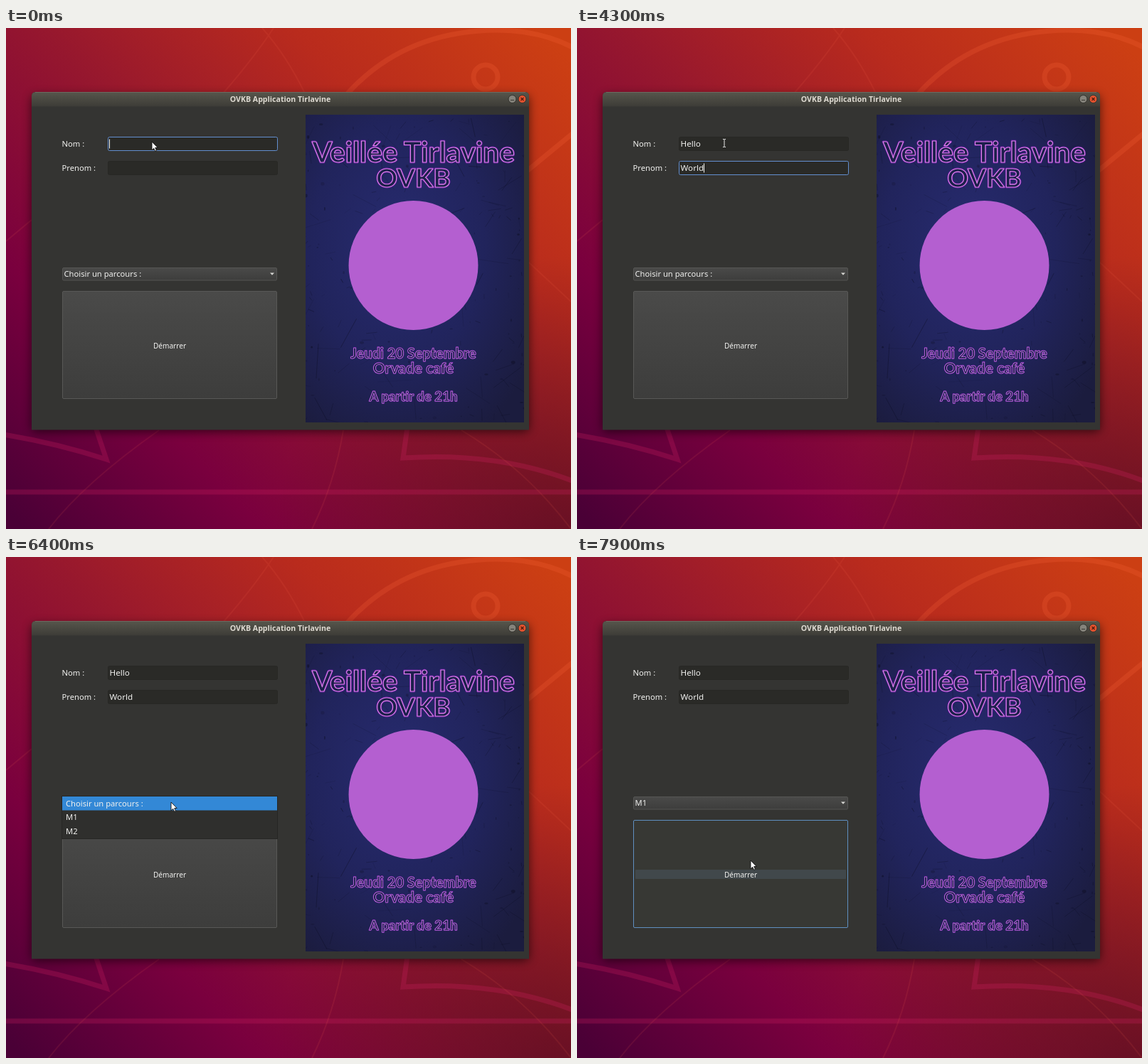
Animation, 794 px wide and 705 px high, one loop 8000 ms. Source, as an HTML page:

```html
<!DOCTYPE html>
<html lang="fr">
<head>
<meta charset="utf-8">
<title>Application</title>
<style>
  html, body { margin: 0; width: 100%; height: 100%; overflow: hidden; background: #7a0a3a; }
  svg { display: block; width: 100vw; height: 100vh; }
  text { font-family: "Noto Sans", "Open Sans", sans-serif; font-size: 11.2px; fill: #f0f0ee; white-space: pre; }
  .field { font-size: 11.65px; }
  .neon text { font-family: Lato, sans-serif; text-anchor: middle; fill: #1d1f4c; stroke-linejoin: round; }
  .neon .halo { stroke: #63209a; stroke-width: 2.8; }
  .neon .line { stroke: #e286ee; stroke-width: 1.15; }
  .neon .fine.halo { stroke-width: 1.8; }
  .neon .fine.line { stroke: #c97be2; stroke-width: .75; }
</style>
</head>
<body>
<svg viewBox="0 0 794 705" preserveAspectRatio="none">
  <defs>
    <linearGradient id="wall" gradientUnits="userSpaceOnUse" x1="770" y1="20" x2="40" y2="720">
      <stop offset="0" stop-color="#cc3f13"/>
      <stop offset=".25" stop-color="#b92b1d"/>
      <stop offset=".5" stop-color="#96172e"/>
      <stop offset=".76" stop-color="#7a003e"/>
      <stop offset="1" stop-color="#4a0036"/>
    </linearGradient>
    <radialGradient id="corner" gradientUnits="userSpaceOnUse" cx="794" cy="740" r="420">
      <stop offset="0" stop-color="#4d0a20" stop-opacity=".7"/>
      <stop offset="1" stop-color="#4d0a20" stop-opacity="0"/>
    </radialGradient>
    <linearGradient id="bar" x2="0" y2="1">
      <stop offset="0" stop-color="#57564c"/>
      <stop offset="1" stop-color="#3d3c37"/>
    </linearGradient>
    <linearGradient id="raised" x2="0" y2="1">
      <stop offset="0" stop-color="#4a4a49"/>
      <stop offset="1" stop-color="#3d3d3c"/>
    </linearGradient>
    <linearGradient id="hover" x2="0" y2="1">
      <stop offset="0" stop-color="#515150"/>
      <stop offset="1" stop-color="#434342"/>
    </linearGradient>
    <radialGradient id="night" cx=".42" cy=".42" r=".72">
      <stop offset="0" stop-color="#272b70"/>
      <stop offset=".55" stop-color="#21245c"/>
      <stop offset="1" stop-color="#1b1c3e"/>
    </radialGradient>
    <filter id="shadow" x="-10%" y="-10%" width="120%" height="125%">
      <feGaussianBlur stdDeviation="7"/>
    </filter>
    <clipPath id="sheet"><rect x="421" y="122" width="307" height="433"/></clipPath>
  </defs>

  <rect width="794" height="705" fill="url(#wall)"/>
  <rect width="794" height="705" fill="url(#corner)"/>
  <g fill="none" stroke="#ff6a3c" stroke-opacity=".2" stroke-width="7">
    <path d="M480 92Q560 4 690 3Q750 3 798 28"/>
    <circle cx="674" cy="69" r="17"/>
    <path d="M730 203L798 147"/>
  </g>
  <g fill="none" stroke="#d02060" stroke-opacity=".26" stroke-width="7">
    <path d="M0 653H794"/>
    <path d="M-4 572Q70 584 141 607L126 562"/>
    <path d="M564 562L558 605Q690 596 798 638"/>
  </g>
  <g fill="none" stroke="#ff6a50" stroke-opacity=".1" stroke-width="2">
    <path d="M305 92Q350 40 376 0M360 0Q395 40 420 92M0 300L36 270M735 330L794 385"/>
    <path d="M430 705Q462 640 474 566M60 705Q110 640 215 566M640 566Q730 620 794 705"/>
  </g>

  <rect x="36" y="95" width="699" height="473" rx="6" fill="#000" opacity=".6" filter="url(#shadow)"/>
  <path d="M36 565.5V96Q36 90 42 90H729Q735 90 735 96V565.5Z" fill="#343432"/>
  <path d="M36 110.500V96Q36 90 42 90H729Q735 90 735 96V110.500Z" fill="url(#bar)"/>
  <path d="M41 90.500H730" stroke="#6b6a60"/>
  <text x="385.500" y="104" text-anchor="middle" style="font-size:10.600px;font-weight:700;fill:#dfdbd2">OVKB Application Tirlavine</text>
  <circle cx="711.500" cy="100" r="5.500" fill="#85837b" stroke="#33322d"/>
  <path d="M709 101.500H714" stroke="#3a3934"/>
  <circle cx="725.500" cy="100" r="5.500" fill="#e5532f" stroke="#33322d"/>
  <path d="M723.500 98L727.500 102M727.500 98L723.500 102" stroke="#4a1a0c" stroke-width="1.200"/>

  <g clip-path="url(#sheet)">
    <rect x="421" y="122" width="307" height="433" fill="url(#night)"/>
    <g id="grunge" stroke="#0c0d20" fill="#0e0f24"></g>
  </g>
  <circle cx="572.500" cy="334" r="91" fill="#b45fd0"/>
  <g id="poster" class="neon"></g>

  <text x="78.500" y="167">Nom :</text>
  <text x="78.500" y="201">Prenom :</text>
  <g id="inputs"></g>

  <rect id="combo" x="79.500" y="337.500" width="301" height="17.500" rx="1.500"/>
  <text id="choice" x="81.500" y="350"></text>
  <path d="M371 344.500H377L374 347.800Z" fill="#d8d8d4"/>

  <rect id="button" x="79.500" y="370.500" width="301" height="151" rx="1.500"/>
  <rect id="band" x="82" y="440" width="296" height="13" rx="1" fill="#41484b"/>
  <text x="230" y="450.500" text-anchor="middle" style="font-size:10.100px">Démarrer</text>

  <g id="popup">
    <rect x="78.500" y="336.500" width="303" height="60" fill="#2f2f2d" stroke="#262624"/>
    <rect id="mark" x="79" width="302" height="19.500" fill="#3388d6"/>
    <text x="84" y="350.500">Choisir un parcours :</text>
    <text x="84" y="370">M1</text>
    <text x="84" y="389.500">M2</text>
  </g>

  <path id="arrow" d="M0 0V11.800L2.700 9.300L4.600 13.300L6.500 12.400L4.700 8.500H8.200Z" fill="#fff" stroke="#111" stroke-width=".9"/>
  <path id="beam" d="M-2 -5.500H-.6L0 -5L.6 -5.500H2M0 -5V5M-2 5.500H-.6L0 5L.6 5.500H2" fill="none" stroke="#e8e8e8" stroke-width="1"/>
</svg>
<script>
const NS = "http://www.w3.org/2000/svg";
const LOOP = 8000, STEP = 100;
const $ = id => document.getElementById(id);

function add(parent, tag, attrs, text) {
  const el = document.createElementNS(NS, tag);
  set(el, attrs);
  if (text) el.textContent = text;
  parent.appendChild(el);
  return el;
}
function set(el, attrs) {
  for (const k in attrs) el.setAttribute(k, attrs[k]);
}
function show(el, on) {
  el.style.display = on ? "" : "none";
}

function neon(text, y, size, fine) {
  for (const layer of ["halo", "line"]) {
    add($("poster"), "text", {
      x: 572.5, y, class: layer + (fine ? " fine" : ""),
      style: `font-size:${size}px;font-weight:700`
    }, text);
  }
}
neon("Veillée Tirlavine", 189, 40.5);
neon("OVKB", 224, 37);
neon("Jeudi 20 Septembre", 465, 20, true);
neon("Orvade café", 485.5, 21, true);
neon("A partir de 21h", 525, 18.6, true);

// Worn paper: scratches and specks, denser near the edges.
let seed = 41;
const rnd = () => (seed = seed * 16807 % 2147483647) / 2147483647;
for (let i = 0; i < 230; i++) {
  const edge = rnd() < .55;
  const x = 421 + 307 * (edge ? (rnd() < .5 ? rnd() ** 2.5 : 1 - rnd() ** 2.5) : rnd());
  const y = 122 + 433 * rnd();
  const opacity = (.15 + .4 * rnd()).toFixed(2);
  if (i % 3) {
    const a = rnd() * Math.PI, len = 5 + 45 * rnd() ** 2;
    add($("grunge"), "path", {
      d: `M${x} ${y}l${len * Math.cos(a)} ${len * Math.sin(a)}`,
      "stroke-width": .4 + .5 * rnd(), opacity
    });
  } else {
    add($("grunge"), "ellipse", {
      cx: x, cy: y, rx: .5 + 2.5 * rnd() ** 2, ry: .5 + 2 * rnd() ** 2, stroke: "none", opacity
    });
  }
}

function makeInput(y, word, times) {
  const g = $("inputs");
  return {
    word, times,
    box: add(g, "rect", { x: 143.5, y: y + .5, width: 238, height: 19, rx: 2, fill: "#2a2a27" }),
    text: add(g, "text", { x: 145.5, y: y + 14, class: "field" }),
    caret: add(g, "rect", { y: y + 3.5, width: 1, height: 13, fill: "#f4f4f0" })
  };
}
const nom = makeInput(153, "Hello", [1300, 1700, 1800, 1900, 2100]);
const prenom = makeInput(187, "World", [3300, 3800, 4000, 4200, 4300]);

function drawInput(f, t, focus, blink) {
  const typed = f.word.slice(0, f.times.filter(k => t >= k).length);
  f.text.textContent = typed;
  set(f.box, { stroke: focus ? "#638fd0" : "#272724" });
  const w = typed ? f.text.getComputedTextLength() : 0;
  set(f.caret, { x: Math.round(145 + w) });
  show(f.caret, focus && !blink);
}

// Pointer keys: time, x, y
const path = [
  [0, 205, 160], [199, 205, 160], [200, 207, 162], [5299, 207, 162], [5300, 199, 157],
  [5500, 199, 157], [5600, 197, 156], [6000, 231, 336], [6100, 231, 336], [6200, 232, 344],
  [6400, 232, 345], [6700, 223, 369], [7200, 223, 369], [7800, 244, 427], [8000, 244, 427]
];
function pointer(t) {
  let i = 1;
  while (i < path.length - 1 && path[i][0] < t) i++;
  const [t0, x0, y0] = path[i - 1], [t1, x1, y1] = path[i];
  const u = Math.min(1, (t - t0) / (t1 - t0));
  const e = u * u * (3 - 2 * u);
  return [x0 + (x1 - x0) * e, y0 + (y1 - y0) * e];
}

function draw(ms) {
  const t = Math.floor(ms / STEP) * STEP;
  const within = (a, b) => t >= a && t < b;
  const [x, y] = pointer(t);

  drawInput(nom, t, t < 2600, within(1000, 1200));
  drawInput(prenom, t, within(2600, 6200), within(4900, 5600));

  const comboFocus = within(7200, 7900);
  const comboHover = within(6000, 6200);
  set($("combo"), {
    fill: within(6200, 6400) ? "#383837" : `url(#${comboHover ? "hover" : "raised"})`,
    stroke: comboFocus ? "#638fc4" : "#555553"
  });
  $("choice").textContent = t < 7200 ? "Choisir un parcours :" : "M1";

  const pressed = t >= 7900;
  set($("button"), {
    fill: pressed ? "#373834" : `url(#${within(7300, 7900) ? "hover" : "raised"})`,
    stroke: pressed ? "#5f8fc0" : "#585856"
  });
  show($("band"), pressed);

  show($("popup"), within(6400, 7200));
  set($("mark"), { y: y > 356.5 ? 356.5 : 337 });

  const beam = within(200, 5600);
  show($("beam"), beam);
  show($("arrow"), !beam);
  set($(beam ? "beam" : "arrow"), { transform: `translate(${Math.round(x)} ${Math.round(y)})` });
}

const start = performance.now();
function tick() {
  draw((performance.now() - start) % LOOP);
  requestAnimationFrame(tick);
}
tick();
</script>
</body>
</html>
```
